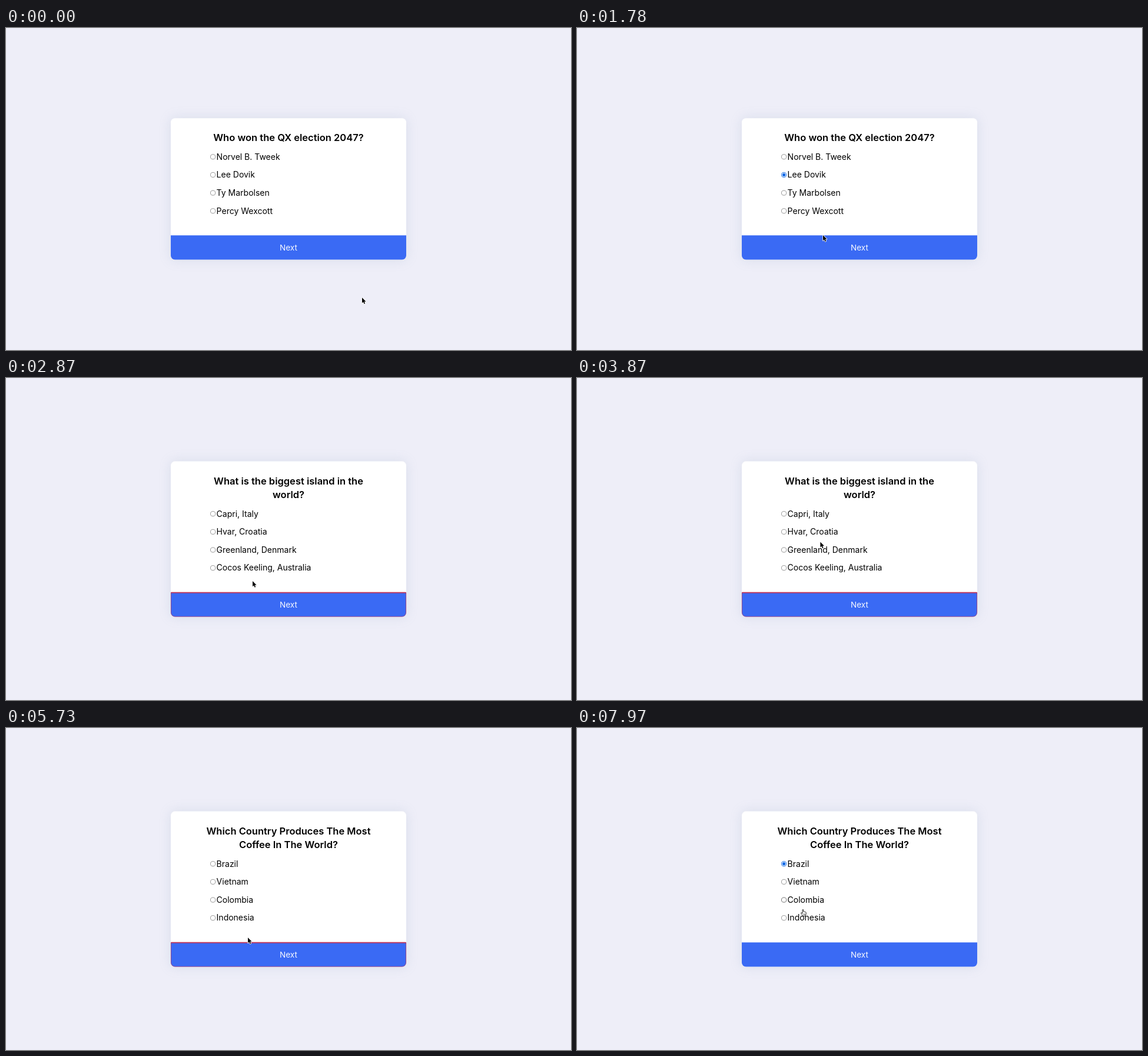
Recreate the animation shown at these times as an HTML page with a canvas. Size 960x547 px, loop 8000 ms.

```html
<!DOCTYPE html>
<html lang="en">
<head>
<meta charset="utf-8">
<title>Quiz</title>
<style>
html, body { margin: 0; width: 100%; height: 100%; overflow: hidden; background: #eeeef8; }
canvas { display: block; width: 960px; height: 547px; }
</style>
</head>
<body>
<canvas id="stage"></canvas>
<script>
const W = 960, H = 547, LOOP = 8000, LAG = 30;
const FONT = 'Inter, "Open Sans", sans-serif';
const OPTION_FONT = `400 14px ${FONT}`;
const canvas = document.getElementById('stage');
const ctx = canvas.getContext('2d');
const dpr = window.devicePixelRatio || 1;
canvas.width = Math.round(W * dpr);
canvas.height = Math.round(H * dpr);

const card = { x: 280, w: 400, radius: 7, buttonH: 41.3 };
const row = { x: 351.6, textX: 357.6, step: 30.65 };

const questions = [
  { top: 153.2, bottom: 393.6, title: ['Who won the QX election 2047?'],
    options: ['Norvel B. Tweek', 'Lee Dovik', 'Ty Marbolsen', 'Percy Wexcott'] },
  { top: 141.6, bottom: 405.6, title: ['What is the biggest island in the', 'world?'],
    options: ['Capri, Italy', 'Hvar, Croatia', 'Greenland, Denmark', 'Cocos Keeling, Australia'] },
  { top: 141.6, bottom: 405.6, title: ['Which Country Produces The Most', 'Coffee In The World?'],
    options: ['Brazil', 'Vietnam', 'Colombia', 'Indonesia'] }
];

// Each click: time, question, chosen option, button focus.
const clicks = [
  { t: 0, q: 0, chosen: -1, focus: false },
  { t: 1050, q: 0, chosen: 1, focus: false },
  { t: 2400, q: 1, chosen: -1, focus: true },
  { t: 4080, q: 1, chosen: 2, focus: false },
  { t: 4950, q: 2, chosen: -1, focus: true },
  { t: 7690, q: 2, chosen: 0, focus: false }
];

// Pointer path: time, x, y.
const path = [
  [0, 605, 458], [80, 605, 458], [820, 396, 252], [1200, 396, 252],
  [1780, 418, 352], [2100, 420, 375], [2620, 420, 375], [2870, 419, 345],
  [3420, 412, 262], [3700, 411, 258], [4000, 415, 292], [4310, 415, 292],
  [4650, 419, 381], [5250, 419, 381], [5730, 411, 356], [6200, 400, 318],
  [6730, 389, 275], [6810, 389, 275], [7570, 385, 231], [7760, 385, 231],
  [8180, 383, 385]
];

function pointerAt(t) {
  let i = 0;
  while (i < path.length - 2 && path[i + 1][0] <= t) i++;
  const [t0, x0, y0] = path[i], [t1, x1, y1] = path[i + 1];
  const u = Math.min(1, Math.max(0, (t - t0) / (t1 - t0)));
  const k = u * u * (3 - 2 * u);
  return { x: x0 + (x1 - x0) * k, y: y0 + (y1 - y0) * k };
}

const rowY = (q, i) => q.top + 35 + (q.title.length - 1) * 23.5 + 30.6 + i * row.step;
const buttonY = q => q.bottom - card.buttonH;

function hitTest(q, p) {
  if (p.x >= card.x && p.x <= card.x + card.w && p.y >= buttonY(q) && p.y <= q.bottom) return 'button';
  ctx.font = OPTION_FONT;
  return q.options.findIndex((text, i) =>
    Math.abs(p.y - rowY(q, i)) <= 11 && p.x >= 347 && p.x <= row.textX + ctx.measureText(text).width);
}

function label(text, x, y, font, color, align) {
  ctx.font = font;
  ctx.fillStyle = color;
  ctx.textAlign = align;
  ctx.fillText(text, x, y);
}

function box(x, y, w, h, radii, color) {
  ctx.beginPath();
  ctx.roundRect(x, y, w, h, radii);
  ctx.fillStyle = color;
  ctx.fill();
}

function circle(x, y, r) {
  ctx.beginPath();
  ctx.arc(x, y, r, 0, Math.PI * 2);
}

function radio(y, checked, hover) {
  const color = checked ? (hover ? '#0b5bd0' : '#1069e6') : (hover ? '#4f4f4f' : '#7a7a7a');
  circle(row.x, y, 4.1);
  ctx.fillStyle = '#fff';
  ctx.fill();
  ctx.strokeStyle = color;
  ctx.lineWidth = checked ? 1 : 0.8;
  ctx.stroke();
  if (!checked) return;
  circle(row.x, y, 2.6);
  ctx.fillStyle = color;
  ctx.fill();
}

function drawButton(q, hover, focus) {
  const y = buttonY(q), r = card.radius;
  box(card.x, y, card.w, card.buttonH, [0, 0, r, r], hover ? '#1b50ee' : '#3a6af4');
  if (focus) {
    ctx.strokeStyle = 'rgba(200, 45, 75, 0.75)';
    ctx.lineWidth = 0.8;
    ctx.beginPath();
    ctx.roundRect(card.x + 0.4, y, card.w - 0.8, card.buttonH - 0.3, [1, 1, r, r]);
    ctx.stroke();
    box(card.x, y - 0.5, card.w, 1.8, 1, '#c23557');
  }
  label('Next', W / 2, y + 25.7, `400 13.6px ${FONT}`, '#f7f9ff', 'center');
}

function drawCard(q, state, hit) {
  ctx.save();
  ctx.shadowColor = 'rgba(140, 165, 190, 0.22)';
  ctx.shadowBlur = 20 * dpr;
  box(card.x, q.top, card.w, q.bottom - q.top, card.radius, '#fff');
  ctx.restore();
  q.title.forEach((line, i) =>
    label(line, W / 2, q.top + 39 + i * 23.5, `600 16.5px ${FONT}`, '#000', 'center'));
  q.options.forEach((text, i) => {
    const y = rowY(q, i);
    radio(y, state.chosen === i, hit === i);
    label(text, row.textX, y + 4.8, OPTION_FONT, '#000', 'left');
  });
  drawButton(q, hit === 'button', state.focus);
}

const arrow = new Path2D('M0 0V9.2L2.1 7.3L3.6 10.7L5.2 10L3.7 6.7H6.6Z');
const hand = new Path2D('M-.9 .5C-.9-.5 .8-.5 .8 .5V3.4C1.2 2.8 2.2 3 2.3 3.7C2.9 3.2 3.7 3.5 3.8 4.2' +
  'C4.5 3.8 5.2 4.2 5.2 5V7.4C5.2 8.7 4.4 9.2 4.3 10.8H-.5C-.6 9.3-2.3 8.2-3.3 6.2' +
  'C-3.8 5.1-2.7 4.7-2 5.4L-.9 6.5Z');

function drawPointer(p, isHand) {
  ctx.save();
  ctx.translate(p.x, p.y);
  ctx.lineJoin = 'round';
  if (isHand) {
    ctx.fillStyle = '#fff';
    ctx.fill(hand);
    ctx.strokeStyle = '#111';
    ctx.lineWidth = 0.9;
    ctx.stroke(hand);
    ctx.lineWidth = 0.6;
    ctx.stroke(new Path2D('M1 7V9.2M2.2 7V9.2M3.4 7V9.2'));
  } else {
    ctx.strokeStyle = '#fff';
    ctx.lineWidth = 1.5;
    ctx.stroke(arrow);
    ctx.fillStyle = '#000';
    ctx.fill(arrow);
  }
  ctx.restore();
}

function draw(t) {
  const state = clicks.filter(c => c.t <= t).pop();
  const q = questions[state.q];
  const hit = hitTest(q, pointerAt(Math.max(0, t - LAG)));
  ctx.setTransform(dpr, 0, 0, dpr, 0, 0);
  ctx.fillStyle = '#eeeef8';
  ctx.fillRect(0, 0, W, H);
  drawCard(q, state, hit);
  drawPointer(pointerAt(t), hit !== -1);
}

const start = performance.now();
function tick() {
  draw((performance.now() - start) % LOOP);
  requestAnimationFrame(tick);
}
tick();
</script>
</body>
</html>
```
